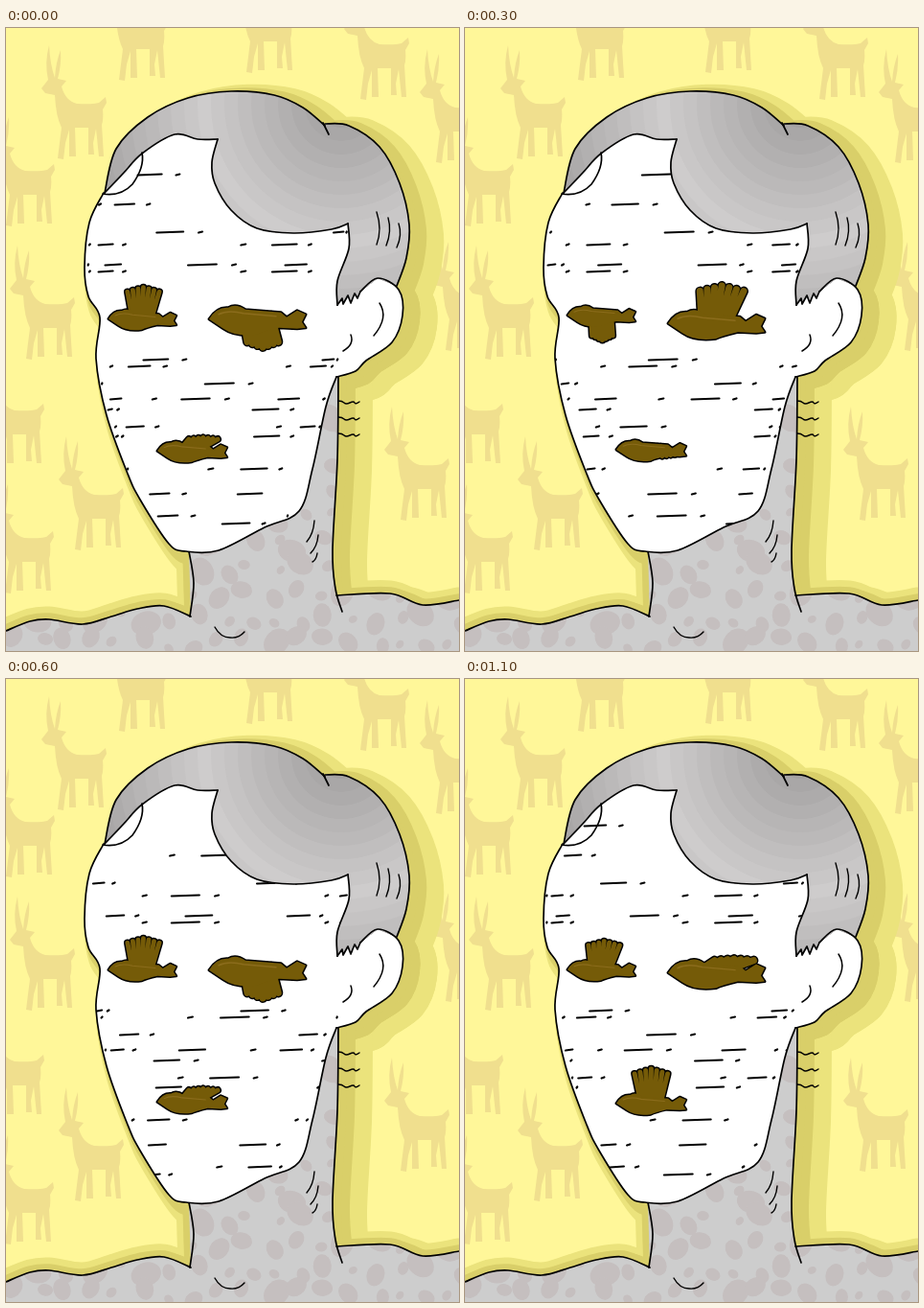
An HTML page with a canvas for the animation above (1.2 s loop, 473 by 650 pixels).

```html
<!DOCTYPE html>
<html>
<head>
<meta charset="utf-8">
<style>
html, body { margin: 0; width: 100%; height: 100%; overflow: hidden; background: #fff799 }
canvas { display: block }
</style>
</head>
<body>
<canvas id="stage" width="473" height="650"></canvas>
<script>
const ctx = document.getElementById('stage').getContext('2d');
const LOOP = 1200, STEP = 100, BEATS = 6, SPEED = 0.18;

// Smooth path data that passes through every point of "x y x y ..."
function curve(text) {
  const n = text.split(' ').map(Number), last = n.length / 2 - 1;
  const at = (i, axis) => n[2 * Math.max(0, Math.min(last, i)) + axis];
  const handle = (i, dir) => [0, 1].map(a => at(i, a) + dir * (at(i + 1, a) - at(i - 1, a)) / 6);
  let d = `M${at(0, 0)} ${at(0, 1)}`;
  for (let i = 0; i < last; i++)
    d += `C${[...handle(i, 1), ...handle(i + 1, -1), at(i + 1, 0), at(i + 1, 1)].join(' ')}`;
  return d;
}
const join = (first, ...rest) => first + rest.map(d => 'L' + d.slice(1)).join('');
function fill(d, color) {
  ctx.fillStyle = color;
  ctx.fill(new Path2D(d));
}
function line(d, width = 1.7, color = '#000') {
  ctx.lineWidth = width;
  ctx.strokeStyle = color;
  ctx.stroke(new Path2D(d));
}
function shifted(x, y, draw) {
  ctx.save();
  ctx.translate(x, y);
  draw();
  ctx.restore();
}
function clipped(d, draw) {
  ctx.save();
  ctx.clip(new Path2D(d));
  draw();
  ctx.restore();
}
let seed;
const random = () => (seed = seed * 16807 % 2147483647) / 2147483647;

const goat = 'M37 63L44 54Q40 36 45 18Q46 38 51 52Q52 36 57 23Q58 38 54 53L63 55 58 61Q62 76 74 79Q90 80 97 78L104 72 105 78 101 85Q102 95 100 101L102 134H97L94 105 91 120 92 132H86V104H72L73 134H66V106L62 120 60 137 54 136 58 104Q52 92 51 70L41 68Z';
const goats = [[0, 0], [-54, 70], [-33, 209], [-65, 320], [18, 408], [-55, 453], [358, 377],
  [64, -82], [197, -90], [316, -62], [395, 4], [405, 200]];

const leftShoulder = curve('0 629 25 619 45 617 80 622 110 614 137 606 165 603 193 614');
const leftNeck = curve('191 546 196 579 192 614');
const rightNeck = curve('347 362 346 450 341 545 344 585 351 609');
const rightShoulder = curve('345 592 401 590 435 602 473 597');
const body = join(leftShoulder, 'M191 546V480L347 362', curve('347 362 346 450 341 545 344 592'),
  rightShoulder) + 'L473 650 0 650Z';

const faceLine = curve('102 172 87 203 82 250 86 280 98 302 94 345 105 404 127 465 140 492 170 538 188 546 222 545 270 521 306 504 320 460 334 395 345 364');
const ear = curve('345 364 365 358 376 347 403 328 414 300 410 273 388 261 370 275');
const face = join(faceLine, ear, 'M362 200L230 100 150 110') + 'Z';

const crown = curve('103 172 115 126 148 93 190 73 235 66 280 70 310 83 333 102');
const nape = curve('333 100 358 102 390 124 411 162 421 205 418 240 408 269');
const sideburn = curve('346 289 346 264 358 230 357 204');
const fringe = curve('357 204 340 210 300 214 262 209 235 190 218 162 215 140 221 116');
const temple = curve('221 116 200 116 176 111 142 131 123 151 103 172');
const zigzag = 'M370 275L367 282 364 277 360 287 357 279 352 288 351 282 346 289';
const hair = join(crown, nape, 'M388 261', zigzag, sideburn, fringe, temple) + 'Z';

// Bark rows: height and the time at which the main dash passes the middle
const rows = [[153, 420], [184, 610], [213, 285], [226, 790], [247, 90], [254, 790], [346, 380],
  [353, 500], [371, 1190], [387, 130], [398, 910], [416, 560], [426, 900], [460, 980],
  [486, 385], [509, 330], [517, 1090]];

const birdBody = 'M-50 1Q-42 -12 -30 -11Q-22 -16 -12 -9L25 -6 31 -1 42 -8 51 -4 47 4 51 10 42 11 23 10Q6 14 0 17Q-22 20 -35 11Z';
const birds = [
  { x: 262, y: 308, size: 1, top: 3.7 },
  { x: 142, y: 303, size: 0.7, top: 5.6 },
  { x: 194, y: 442, size: 0.72, top: 4.8 }
];

function drawBackground() {
  fill('M0 0H473V650H0Z', '#fff799');
  for (const [x, y] of goats) shifted(x, y, () => fill(goat, '#f0df8e'));
  // Two soft steps of shadow, cast to the lower right
  const head = join(hair.slice(0, -1), ear) + 'Z';
  for (const [color, reach] of [['#ebe37c', 18], ['#d9cf69', 9]]) {
    line(body, reach * 1.5, color);
    shifted(reach, reach * 0.6, () => [head, face, body].forEach(d => {
      line(d, reach * 2, color);
      fill(d, color);
    }));
  }
}

function drawBody() {
  fill(body, '#cdcdcd');
  clipped(body, () => {
    seed = 11;
    ctx.fillStyle = '#c5bfbf';
    for (let y = 400; y < 660; y += 26)
      for (let x = 0; x < 480; x += 27) {
        const r = 4 + 10 * random() ** 1.5;
        ctx.beginPath();
        ctx.ellipse(x + random() * 18, y + random() * 16, r * 1.15, r * 0.9, random() * 3, 0, 7);
        ctx.fill();
      }
  });
  [leftShoulder, leftNeck, rightNeck, rightShoulder].forEach(d => line(d));
  line('M218 625Q224 636 234 636Q243 637 249 630M322 514Q321 528 314 536M326 529Q325 541 318 548M325 548Q324 555 320 557', 1.4);
  for (const y of [391, 408, 425]) line(`M347 ${y - 2}q4 0 6 2t6 0t5 0t5 -1`, 1.4);
}

// Dashes travel around an upright column whose radius shrinks towards the chin
function drawDash(t, y, mid, length) {
  const r = 136 - 68 * ((y - 240) / 280) ** 2, half = length / 2 / r, limit = Math.PI / 2;
  const edge = a => 221 + r * Math.sin(Math.max(-limit, Math.min(limit, a)));
  for (const lap of [-LOOP, 0, LOOP]) {
    const turn = (t - mid + lap) * SPEED / r;
    if (Math.abs(turn) < limit)
      line(`M${edge(turn - half)} ${y + 0.5}L${edge(turn + half)} ${y - 0.5}`, 2.2);
  }
}

function drawBark(t) {
  rows.forEach(([y, mid], i) => {
    drawDash(t, y, mid, 30);
    drawDash(t, y, mid - 185, 4);
    if (i % 2) drawDash(t, y, mid + 260, 5);
    if (i % 5 == 4) drawDash(t, y, mid + 620, 28);
  });
}

function drawHair() {
  clipped(hair, () => {
    for (let r = 290; r > 0; r -= 14) {
      const g = 206 - 50 * Math.abs(1 - r / 150);
      ctx.fillStyle = `rgb(${g},${g - 2},${g - 2})`;
      ctx.beginPath();
      ctx.arc(350, 80, r, 0, 7);
      ctx.fill();
    }
  });
  [crown, nape, zigzag, sideburn, fringe, temple].forEach(d => line(d));
  line('M331 99L337 111M142 130Q145 145 132 163Q120 176 101 173');
  line('M387 192Q393 210 387 226M399 198Q403 212 397 227M410 204Q414 216 408 229', 1.4);
}

// Wings rise and fall on a cosine; flat wings sweep back
function drawBird({ x, y, size, top }, beat) {
  const lift = Math.cos((beat - top) / BEATS * 2 * Math.PI);
  const sweep = 24 * (1 - Math.abs(lift));
  let wing = '';
  for (let i = -3; i <= 3; i++) {
    const reach = 46 - 2.5 * Math.abs(i);
    wing += `M${i * 5} -3L${i * (6.5 + 1.5 * lift) + sweep} ${-4 - reach * lift}`;
  }
  shifted(x, y + 3 * size * (lift - 1), () => {
    ctx.scale(size, size);
    line(wing, 7 + 3 / size, '#000');
    line(birdBody, 3 / size);
    line(wing, 7, '#755b08');
    fill(birdBody, '#755b08');
    line('M-40 -4Q-30 -9 -14 -5L20 -2', 1.5, '#8b6c1c');
  });
}

function draw(now) {
  const t = Math.floor(now % LOOP / STEP) * STEP;
  ctx.lineCap = ctx.lineJoin = 'round';
  drawBackground();
  drawBody();
  fill(face, '#fff');
  clipped(face, () => drawBark(t));
  drawHair();
  line(faceLine);
  line(ear);
  line('M390 287Q400 302 384 321M360 320Q364 330 352 337', 1.5);
  birds.forEach(bird => drawBird(bird, t / STEP % BEATS));
}

const start = performance.now();
function tick() {
  draw(performance.now() - start);
  requestAnimationFrame(tick);
}
tick();
</script>
</body>
</html>
```
